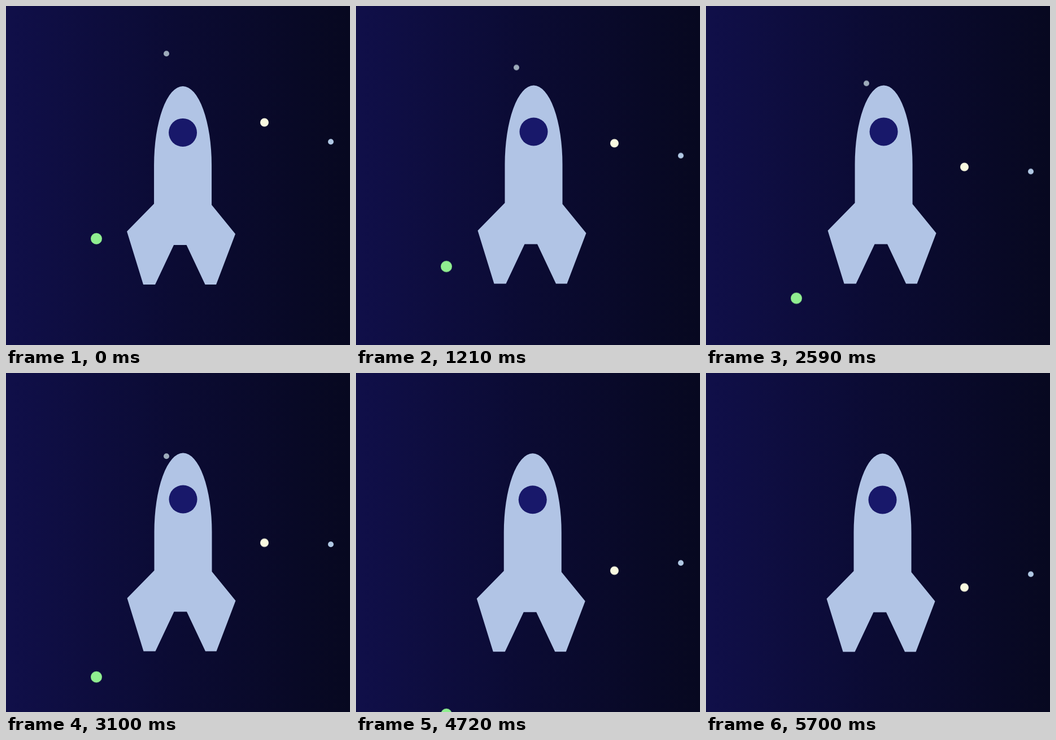
Animation of 609 by 600 pixels, one loop 5730 ms. Source, as an HTML page without scripts:

```html
<!DOCTYPE html>
<html lang="en">
<head>
<meta charset="utf-8">
<title>Rocket</title>
<style>
  html, body { margin: 0; width: 100%; height: 100%; overflow: hidden; background: #0b0b32; }
  svg { display: block; width: 100%; height: 100%; }
  .star { animation: fall 5.73s linear infinite; }
  .far { --drop: 116.4px; }
  .mid { --drop: 174.4px; }
  .near { --drop: 233.2px; }
  @keyframes fall { to { transform: translateY(var(--drop)); } }
</style>
</head>
<body>
<svg viewBox="0 0 609 600">
  <defs>
    <linearGradient id="sky">
      <stop offset="0" stop-color="#100f49"/>
      <stop offset=".5" stop-color="#0b0b33"/>
      <stop offset="1" stop-color="#070820"/>
    </linearGradient>
  </defs>
  <rect width="609" height="600" fill="url(#sky)"/>

  <circle class="star far" cx="284" cy="84.3" r="5" fill="#9dabba"/>
  <circle class="star far" cx="575" cy="240.3" r="5" fill="#b0c8e4"/>
  <circle class="star mid" cx="457.5" cy="206" r="7.5" fill="#f9f9e0"/>
  <circle class="star near" cx="160" cy="411.7" r="10" fill="#90ee90"/>

  <g>
    <path fill="#b1c4e5" d="M262 350V282A51 140 0 0 1 364 282V352L406 403.5 372 493H352.5L319.5 423H297L264 493H243L214 399Z"/>
    <circle cx="313" cy="224" r="25" fill="#18186a"/>
    <!-- diagonal shake, restarted with each loop of the stars -->
    <animateTransform id="shake" attributeName="transform" type="translate"
      values="0 0;4 -4;-1 1;0 0" keyTimes="0;.4;.9;1"
      begin="0s;shake.end" dur="196.9ms" repeatDur="5.73s"/>
  </g>
</svg>
</body>
</html>
```
